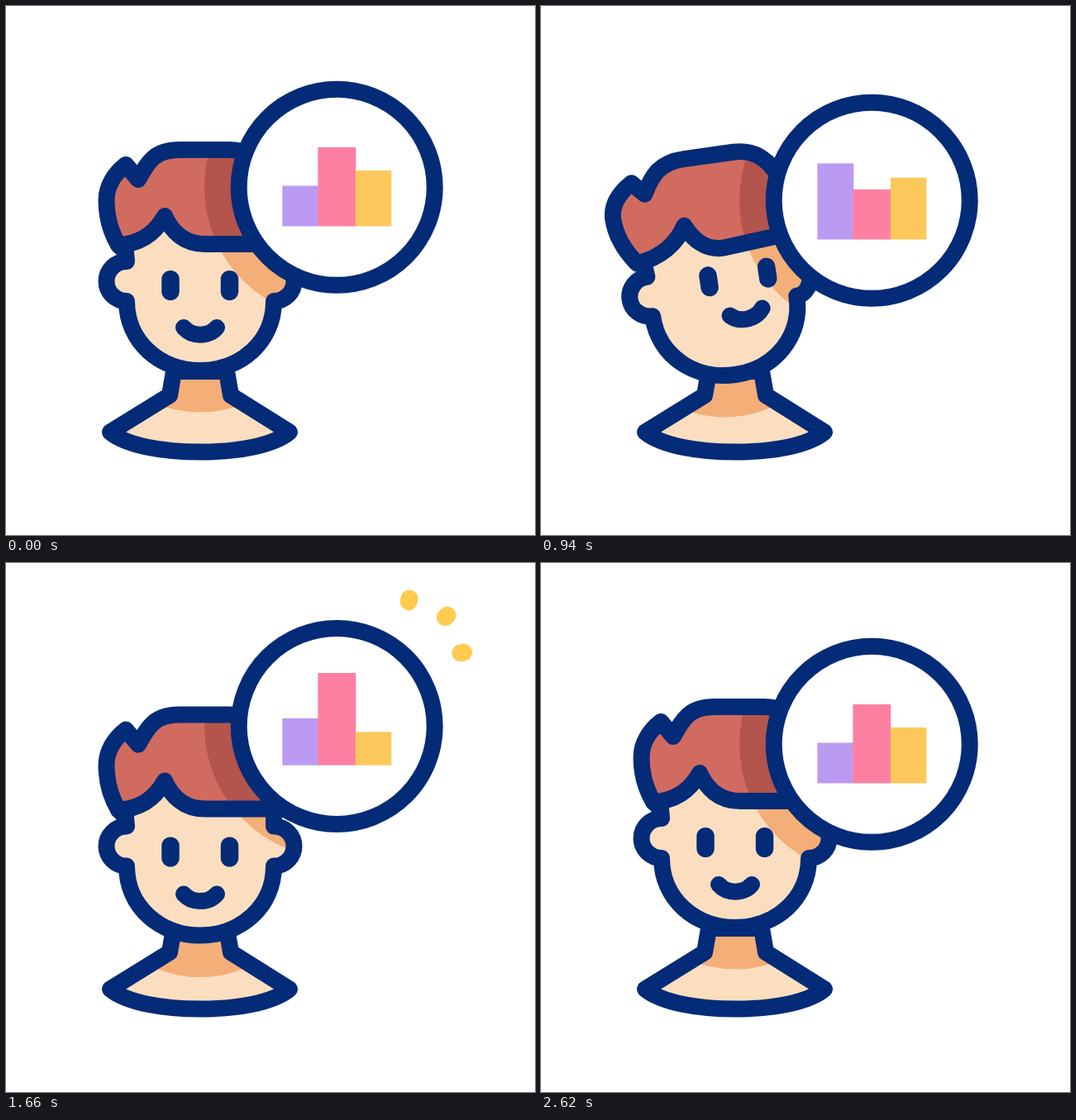
Write an HTML page that moves like this. It is 640 px wide and 640 px high and loops after 3000 ms.

```html
<!DOCTYPE html>
<html lang="en">
<head>
<meta charset="utf-8">
<title>Thinking about rankings</title>
<style>
  html, body { margin: 0; width: 100%; height: 100%; overflow: hidden; background: #fff; }
  svg { display: block; width: 100vw; height: 100vh; }
  svg * { animation: 3s ease-in-out infinite; }

  .line { fill: none; stroke: #042b77; stroke-width: 20; stroke-linecap: round; stroke-linejoin: round; }
  .skin { fill: #fbdebf; }
  .skin-shade { fill: #f4ae78; }
  .hair-fill { fill: #d16b60; }
  .hair-shade { fill: #b3544d; }

  /* head: rotates, and its shapes turn a little towards the bubble */
  .head { transform-origin: 235px 442px; animation-name: dip, tilt, turn; }
  .neck-shade { animation-name: dip, tilt; }
  .face {
    --front: path("M192 254L136 289L145 298L146 309C132 309 121.5 320 121.5 333C121.5 346 132 357 146 357C146 406 186 441 235 441C284 441 324 406 324 357C338 357 348.5 346 348.5 333C348.5 320 338 309 324 309L324 298L330 280Z");
    --turned: path("M192 254L136 289L145 298L146 309C132 309 121.5 320 121.5 333C121.5 346 132 357 146 357C146 406 186 441 235 441C284 441 322 406 322 357C333 357 341.5 346 341.5 333C341.5 320 333 309 323 309L323 298L330 280Z");
  }
  .hair {
    --front: path("M136 289C165 288 182 272 192 254C200 272 215 288 241 288L333 288C340 260 330 225 315 200C305 184 292 174 270 174L210 174C180 174 172 188 160 210L145 192C132 202 121.5 217 121.5 235C121.5 256 127 274 136 289Z");
    --turned: path("M136 291C166 289 188 273 199 254C207 272 221 288 243 287L333 280C340 260 330 225 315 200C305 184 292 174 270 174L210 174C180 174 169 188 157 209.5L143 194C128 203 115 216 115 234C115 256 125 276 136 291Z");
  }
  .face, .hair { d: var(--front); }
  @keyframes dip {
    0%, 6.67% { translate: 0 0; }
    22%, 46.67% { translate: 0 5px; }
    62.67% { translate: 0 13px; }
    86.67%, 100% { translate: 0 0; }
  }
  @keyframes tilt {
    0%, 6.67%, 54.67%, 100% { rotate: 0deg; }
    22%, 43.67% { rotate: -8deg; }
  }
  @keyframes turn {
    0%, 6.67%, 54.67%, 100% { d: var(--front); }
    22%, 43.67% { d: var(--turned); }
  }

  /* eyes and mouth */
  .features { animation-name: nod; }
  .eyes { transform-origin: 234.7px 338px; animation-name: look; }
  .eyes path { transform-origin: 234.7px 338px; animation-name: blink; stroke-width: 21.5; }
  .mouth { transform-origin: 235px 393px; animation-name: smile; }
  @keyframes nod {
    0%, 46.67%, 86.67%, 100% { translate: 0 0; }
    62.67% { translate: 0 20px; }
  }
  @keyframes look {
    0%, 6.67%, 54.67%, 100% { translate: 0 0; rotate: 0deg; }
    22%, 43.67% { translate: 3.6px -10px; rotate: -8.5deg; }
  }
  @keyframes blink {
    0%, 21.67%, 28.67%, 100% { scale: 1 1; }
    25% { scale: 1 .15; }
  }
  @keyframes smile {
    0%, 6.67%, 54.67%, 100% { translate: 0 0; rotate: 0deg; }
    22%, 43.67% { translate: 14px -19px; rotate: -13deg; }
  }

  /* bubble */
  .bob { animation-name: bob; }
  @keyframes bob {
    0%, 6.67%, 86.67%, 100% { translate: 0 0; }
    23.33%, 25.33% { translate: 0 23px; }
    48%, 53.33% { translate: 0 -25px; }
    64.67%, 68% { translate: 0 23px; }
  }

  /* bars: scale 1 is 100 units tall */
  .bar { transform-origin: 400px 266.5px; }
  .left { fill: #bb9bf1; animation-name: left; }
  .mid { fill: #fd80a2; animation-name: mid; }
  .right { fill: #fcc85b; animation-name: right; }
  @keyframes left {
    0%, 6.67% { scale: 1 .49; }
    30%, 36% { scale: 1 .92; }
    56.67%, 62% { scale: 1 .565; }
    85.33%, 100% { scale: 1 .49; }
  }
  @keyframes mid {
    0%, 6.67% { scale: 1 .955; }
    26%, 36% { scale: 1 .605; }
    56.67%, 62% { scale: 1 1.12; }
    85.33%, 100% { scale: 1 .955; }
  }
  @keyframes right {
    0%, 6.67% { scale: 1 .675; }
    22.67% { scale: 1 .77; }
    36% { scale: 1 .74; }
    56.67%, 62% { scale: 1 .4; }
    85.33%, 100% { scale: 1 .675; }
  }

  /* rays */
  .rays { fill: none; stroke: #feca4f; stroke-width: 21; stroke-linecap: round; animation-name: show; animation-timing-function: step-end; }
  .rays path { stroke-dasharray: 1 9; animation-name: shoot; }
  @keyframes show {
    0%, 57.33%, 100% { opacity: 0; }
    37% { opacity: 1; }
  }
  @keyframes shoot {
    0%, 37% { stroke-dashoffset: 1; }
    45.33%, 50% { stroke-dashoffset: 0; }
    57.33%, 100% { stroke-dashoffset: -1; }
  }
</style>
</head>
<body>
<svg viewBox="0 0 640 640">
  <defs>
    <path id="bust" d="M203 442L198 471L126 515.5C146 532 190 539.5 235 539.5C280 539.5 323 532 343 515.5L272 471L267 442Z"/>
    <clipPath id="bust-clip"><use href="#bust"/></clipPath>
    <clipPath id="face-clip"><path class="head face"/></clipPath>
    <clipPath id="hair-clip"><path class="head hair"/></clipPath>
  </defs>

  <use href="#bust" class="skin"/>
  <g clip-path="url(#bust-clip)"><circle class="head neck-shade skin-shade" cx="235" cy="352" r="139.5"/></g>
  <use href="#bust" class="line"/>

  <path class="head face skin"/>
  <g clip-path="url(#face-clip)"><circle class="bob skin-shade" cx="400" cy="219" r="160"/></g>
  <path class="head face line"/>

  <path class="head hair hair-fill"/>
  <g clip-path="url(#hair-clip)"><circle class="bob hair-shade" cx="400" cy="219" r="160"/></g>
  <path class="head hair line"/>

  <g class="features">
    <g class="eyes">
      <path class="line" d="M199 330.7V345.3"/>
      <path class="line" d="M270.5 330.7V345.3"/>
    </g>
    <path class="line mouth" d="M215 389C225 400.5 245 400.5 255 389"/>
  </g>

  <g class="bob">
    <circle class="line" cx="400.2" cy="219.3" r="118.5" style="fill:#fff"/>
    <rect class="bar left" x="334.3" y="166.5" width="44" height="100"/>
    <rect class="bar mid" x="377.3" y="166.5" width="46" height="100"/>
    <rect class="bar right" x="422.8" y="166.5" width="43.5" height="100"/>
    <g class="rays">
      <path pathLength="1" d="M483.5 89.5L488 65"/>
      <path pathLength="1" d="M516 102L534 85"/>
      <path pathLength="1" d="M529.5 135L553.5 130"/>
    </g>
  </g>
</svg>
</body>
</html>
```
